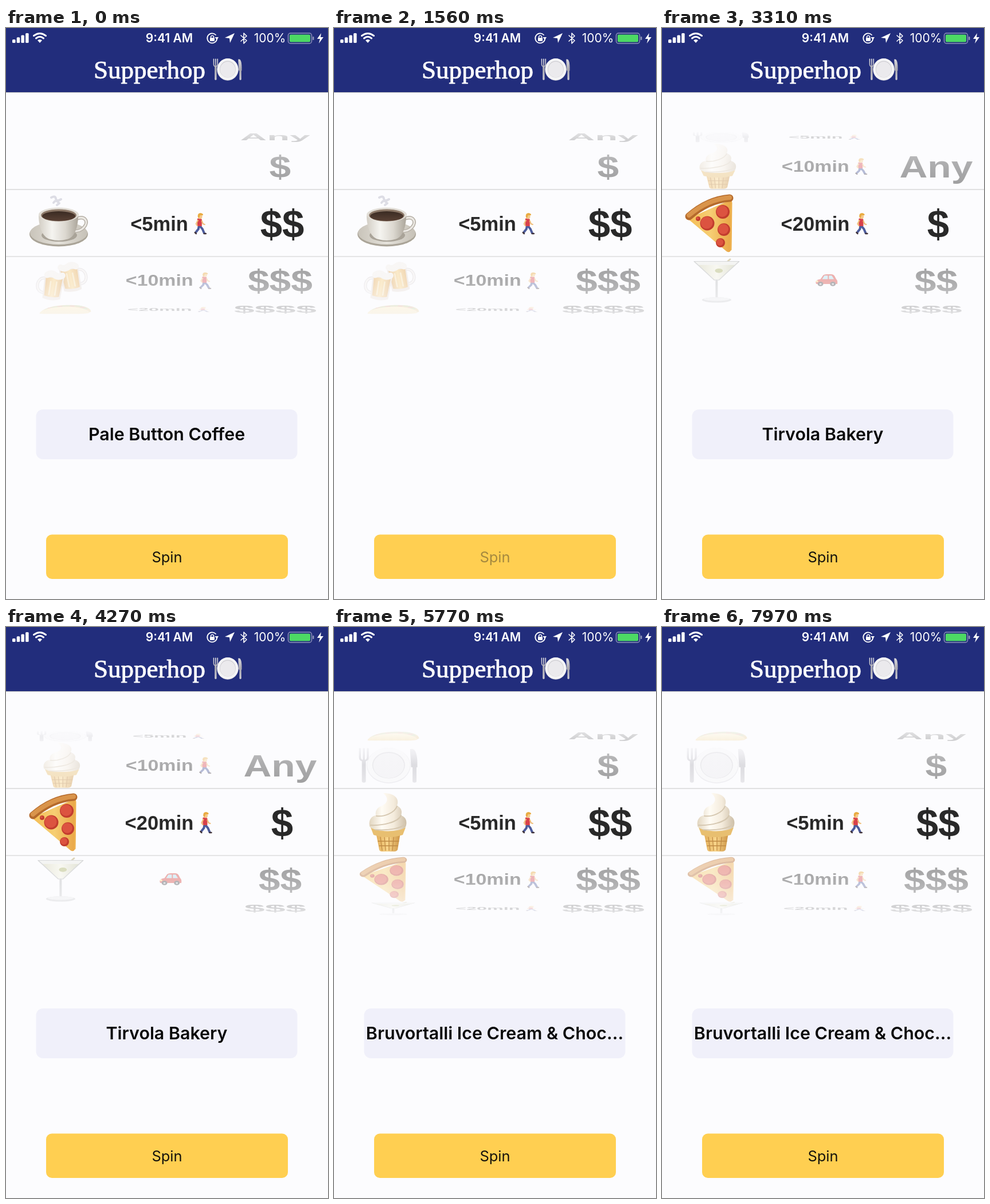
Animation, 562 px wide and 997 px high, one loop 8.07 s. Source, as an HTML page with a canvas:

```html
<!DOCTYPE html>
<html lang="en">
<head>
<meta charset="utf-8">
<title>Picker</title>
<style>
  html, body { margin: 0; width: 100%; height: 100%; overflow: hidden; background: #fcfcfe; }
  canvas { display: block; }
</style>
</head>
<body>
<canvas id="stage" width="562" height="997"></canvas>
<script>
const g = document.getElementById('stage').getContext('2d');
const LOOP = 8070, ROLL = 600, STAGGER = 32;
const MID = 341, RADIUS = 165, STEP = 38 * Math.PI / 180;
const BG = '#fcfcfe';

// Drawing helpers
function fill(color, d) { g.fillStyle = color; g.fill(new Path2D(d)); }
function line(color, width, d) {
  g.strokeStyle = color;
  g.lineWidth = width;
  g.lineCap = g.lineJoin = 'round';
  g.stroke(new Path2D(d));
}
function oval(color, x, y, rx, ry = rx) {
  g.fillStyle = color;
  g.beginPath();
  g.ellipse(x, y, rx, ry, 0, 0, 7);
  g.fill();
}
function box(color, x, y, w, h, r = 0) {
  g.fillStyle = color;
  g.beginPath();
  g.roundRect(x, y, w, h, r);
  g.fill();
}
function text(str, x, y, font, color, align = 'center') {
  g.font = font;
  g.fillStyle = color;
  g.textAlign = align;
  g.fillText(str, x, y);
}
function at(x, y, sx, sy, draw, turn = 0) {
  g.save();
  g.translate(x, y);
  g.rotate(turn);
  g.scale(sx, sy);
  draw();
  g.restore();
}
function ramp(x1, y1, x2, y2, ...colors) {
  const grad = g.createLinearGradient(x1, y1, x2, y2);
  colors.forEach((c, i) => grad.addColorStop(i / (colors.length - 1), c));
  return grad;
}

// Pictures, each about 100 px wide around its centre
function coffee() {
  oval('#aaa498', 0, 19, 51, 21.5);
  oval(ramp(-50, 0, 50, 0, '#c9c4ba', '#e4e1da', '#c6c1b7'), 0, 17, 50, 20);
  oval('#a9a398', 1, 21, 31, 11);
  line('#b5afa5', 6, 'M31 -8C46 -14 53 -3 44 7C40 12 32 14 26 14');
  line('#ece9e4', 3, 'M31 -8C46 -14 53 -3 44 7C40 12 32 14 26 14');
  fill(ramp(-35, 0, 35, 0, '#d3cec5', '#f5f4f0', '#dcd8d0', '#a9a398'),
    'M-35 -14C-35 8 -27 26 -14 28Q0 32 14 28C27 26 34 8 34 -14Z');
  oval('#e2ded7', 0, -15, 35, 12.5);
  oval('#8d7969', 0, -14, 31, 10.5);
  oval(ramp(0, -24, 0, -4, '#352720', '#594135'), 0, -12.5, 29, 8.5);
  line('#dddde5', 4, 'M-13 -45Q-6 -49 -5 -43T4 -42M-9 -36Q-5 -42 -1 -37M-3 -32L1 -35');
}
function mug() {
  line('#d8d3d6', 6, 'M-18 -12C-36 -14 -37 17 -18 17');
  line('#f4f1ee', 3, 'M-18 -12C-36 -14 -37 17 -18 17');
  fill('#e4d9cf', 'M-20 -23H20L18 28Q0 34 -18 28Z');
  fill(ramp(-16, 0, 16, 0, '#e2a44c', '#f8d07c', '#dc9d48'), 'M-17 -14H17L15 23Q0 27 -15 23Z');
  line('#f7dfaa', 3, 'M-6 -6V20M6 -6V20');
  line('#f3efe9', 13, 'M-15 -19Q-8 -25 0 -20T15 -20');
}
function beers() {
  at(17, -9, -.88, 1.12, mug, -.16);
  at(-13, 10, .88, 1.12, mug, .12);
}
function taco() {
  fill('#dcb35c', 'M-47 28C-42 -13 -17 -36 11 -34C35 -32 47 -12 48 17Q43 29 26 30Z');
  line('#a3ba70', 8, 'M-36 4Q-24 -22 3 -28T38 -5');
  for (const [x, y] of [[-28, -9], [-10, -22], [13, -26], [32, -15]]) oval('#d98468', x, y, 5);
  fill(ramp(0, -20, 0, 34, '#ffe69c', '#edc872'),
    'M-48 30C-43 -3 -20 -22 4 -20C29 -19 44 4 45 25Q42 34 25 34H-40Q-47 34 -48 30Z');
}
function plate() {
  const metal = ramp(0, -38, 0, 38, '#dedde2', '#a9a8b0', '#cccbd1');
  oval('#dddce1', 0, 1, 39, 40);
  oval('#f5f5f6', 0, 0, 38, 39);
  oval('#cdccd1', 0, 0, 29, 30);
  oval('#ebeaed', 0, 1, 27.5, 28.5);
  line(metal, 3.5, 'M-51 -37V-18Q-51 -10 -44 -10T-37 -18V-37M-44 -37V-10');
  line(metal, 7, 'M-44 -9V36');
  fill(metal, 'M38 -36Q50 -41 51 -8V5H40Z');
  line(metal, 7, 'M46 3V36');
}
function cone() {
  fill(ramp(-22, 0, 25, 0, '#dfa750', '#f8d58b', '#cb9243'), 'M-20 12H25L19 48Q17 51 13 51H-8Q-12 51 -13 48Z');
  line('#c08b44', 1.3, 'M-11 26L-8 49M-4 26L-2 49M4 26V49M12 26L10 49M-15 33H21M-13 41H19');
  fill('#e8bf70', 'M-28 9Q2 20 33 9L28 22Q2 30 -23 22Z');
  fill(ramp(-30, 0, 34, 0, '#e2d6c0', '#fffcf5', '#f4ebdc', '#cdbfa8'),
    'M-30 7C-32 -5 -26 -11 -19 -12C-21 -22 -14 -27 -8 -29C2 -34 4 -42 -6 -51C13 -51 23 -42 18 -29C27 -25 27 -17 25 -12C35 -9 36 1 33 8C25 18 -23 18 -30 7Z');
  line('#d5c7b0', 2, 'M-18 -11C-4 -9 14 -17 18 -28M-28 5C-8 6 20 0 25 -12M-20 13C4 15 26 10 32 3');
}
function pizza() {
  fill(ramp(-45, 0, 30, 0, '#f4bd55', '#f6ce73', '#e9a546'), 'M-47 -8L30 -42L29 45Q26 55 17 46Z');
  line('#b56a2c', 13, 'M-45 -12Q-12 -41 26 -44');
  line('#d9944b', 8, 'M-45 -14Q-12 -42 26 -45');
  for (const [x, y, r] of [[-13, 0, 12.5], [14, -20, 12], [16, 11, 11], [10, 34, 8], [-29, -8, 4]]) {
    oval('#c23c2e', x, y, r);
    oval('#dc5340', x - 1, y - 1, r - 2);
  }
  line('#eeb14e', 3, 'M29 -36L28 46');
}
function cocktail() {
  line('#b6a465', 3, 'M24 -48L-4 -16');
  fill('#e9eae4', 'M-40 -43H40L5 0H-5Z');
  fill(ramp(-30, 0, 30, 0, '#d3d2b2', '#f2f1df', '#c6c8a8'), 'M-33 -35H33L4 -2H-4Z');
  oval('#a9b064', 4, -22, 7, 5);
  line('#a9abab', 1.5, 'M-40 -43H40L4 -1H-4Z');
  line('#b5b7b8', 4, 'M0 0V42');
  oval('#b9bbbd', 0, 44, 26, 6);
  oval('#e3e4e5', 0, 42, 23, 4);
}
function car() {
  fill('#d53b35', 'M-19 2Q-17 -2 -11 -3L-6 -12Q-4 -14 0 -14H8Q12 -14 14 -10L17 -3Q20 0 19 8H-18Q-20 7 -19 2Z');
  fill('#aee0ee', 'M-8 -3L-4 -11H2V-3ZM4 -3V-11H9L13 -3Z');
  for (const x of [-11, 11]) {
    oval('#39383d', x, 8, 5);
    oval('#c5c5c9', x, 8, 2);
  }
  oval('#ffdf75', -17, 2, 2);
}
function walker() {
  line('#4d5c9c', 4, 'M-2 4L3 10L6 17M-3 4L-4 10L-8 15');
  line('#40333b', 2.5, 'M6 18H9M-10 16L-8 18');
  fill('#d8414a', 'M-6 -8Q-2 -10 2 -7L2 5H-6Z');
  line('#f0bd79', 2.2, 'M-5 -5L-8 1L-6 4M2 -4L4 1L7 2');
  oval('#f5c98a', -1, -12, 3.8, 4.5);
  fill('#e9ac42', 'M-5 -11Q-6 -18 0 -18Q5 -17 4 -14L-1 -14L-3 -9Z');
}

const walk = label => () => {
  g.font = 'bold 34.5px "Liberation Sans", Arial, sans-serif';
  const half = g.measureText(label).width / 2;
  text(label, -half - 20, 12.5, g.font, '#292929', 'left');
  at(half + 2, 0, 1, 1, walker);
};
const price = label => () =>
  text(label, 0, 25, 'bold 69px "Liberation Sans", Arial, sans-serif', '#292929');

const columns = [
  { x: 92, rows: [coffee, beers, taco, plate, cone, pizza, cocktail] },
  { x: 287.5, rows: [walk('<5min'), walk('<10min'), walk('<20min'), car] },
  { x: 482, rows: ['Any', '$', '$$', '$$$', '$$$$'].map(price) }
];
const spins = [
  { start: 1570, from: [0, 0, 2], to: [7, 5, 6] },
  { start: 2600, from: [0, 1, 1], to: [5, 2, 1] },
  { start: 4723, from: [5, 2, 1], to: [11, 8, 7] }
];
const places = ['Pale Button Coffee', 'St. Ovrin Coffee At TULV',
  'Tirvola Bakery', 'Bruvortalli Ice Cream & Choc...'];

function drawColumn({ x, rows }, pos, wraps) {
  const n = rows.length;
  for (let i = Math.ceil(pos - 2.3); i <= pos + 2.3; i++) {
    if (!wraps && (i < 0 || i >= n)) continue;
    const angle = (i - pos) * STEP, depth = Math.cos(angle);
    const s = 1 / (1 + .085 * (1 - depth));
    at(281 + (x - 281) * s, MID + RADIUS * Math.sin(angle) * s, s, s * depth, rows[(i + n) % n]);
  }
}

function drawWheels(t, spin) {
  g.save();
  g.beginPath();
  g.rect(0, 179, 562, 325);
  g.clip();
  columns.forEach((col, i) => {
    const from = spin.from[i], to = spin.to[i];
    const u = Math.min(1, Math.max(0, (t - spin.start - STAGGER * (2 - i)) / ROLL));
    const moving = u > 0 && u < 1 && from !== to;
    const pos = u < 1 ? from + (to - from) * (1 - (1 - u) ** 3) : to % col.rows.length;
    drawColumn(col, pos, moving);
  });
  // Fade everything outside the selected band
  for (const [edge, band] of [[179, 282], [504, 399]]) {
    const veil = g.createLinearGradient(0, edge, 0, band);
    for (const [stop, a] of [[0, .9], [.15, .8], [.55, .63], [1, .54]])
      veil.addColorStop(stop, `rgba(252,252,254,${a})`);
    box(veil, 0, Math.min(edge, band), 562, Math.abs(band - edge));
  }
  g.restore();
  box('#c8c8c8', 0, 281.5, 562, 1);
  box('#d0d0d0', 0, 398.5, 562, 1);
}

function drawHeader() {
  const white = '#fff', ui = 'Inter, Roboto, sans-serif';
  box('#222d7c', 0, 0, 562, 112);
  box('#b0b1b8', 0, 112, 562, 1);
  for (let i = 0; i < 4; i++) {
    const h = 6 + i * 3.7;
    box(white, 11 + i * 7.7, 26 - h, 5.5, h, 1.5);
  }
  fill(white, 'M59 26L55 21.5Q59 18.5 63 21.5Z');
  line(white, 3, 'M52.5 18Q59 12.5 65.5 18M48.5 13.5Q59 5.5 69.5 13.5');
  text('9:41 AM', 285, 25, `600 21px ${ui}`, white);
  line(white, 1.8, 'M366 12A8.5 8.5 0 1 0 368 20');
  fill(white, 'M364.5 16H371L368 21Z');
  box(white, 356, 17, 8, 6, 1);
  line(white, 1.5, 'M357.5 17V15Q360 11.5 362.5 15V17');
  fill(white, 'M399 9L391 26L390 18L382 17Z');
  line(white, 1.6, 'M410 13L420 22L415 27V9L420 14L410 23');
  text('100%', 460.5, 25, `400 21px ${ui}`, white);
  g.strokeStyle = '#8c93b8';
  g.lineWidth = 1.5;
  g.beginPath();
  g.roundRect(492.5, 9, 41, 18, 4);
  g.stroke();
  box('#4cd964', 495, 11.5, 36, 13, 2);
  box('#8c93b8', 535, 15, 2.5, 6, 1);
  fill(white, 'M550 9L543 19H548L546 27L554 16H549Z');

  const serif = '45px "Liberation Serif", "Times New Roman", serif';
  text('Supperhop', 153, 88, serif, white, 'left');
  g.strokeStyle = white;
  g.lineWidth = .9;
  g.strokeText('Supperhop', 153, 88);
  at(387, 72, .48, .48, plate);
}

function draw(t) {
  const last = spins.filter(s => t >= s.start - 60).length;
  const spin = spins[Math.max(0, last - 1)];
  const busy = last > 0 && t < spin.start + ROLL + 2 * STAGGER;

  box(BG, 0, 0, 562, 997);
  drawHeader();
  drawWheels(t, spin);
  if (!busy) {
    box('#f0f0fa', 52.5, 666, 456, 87, 12);
    text(places[last], 280.5, 720, '600 30.4px Inter, Roboto, sans-serif', '#080808');
  }
  box('#ffcf51', 70, 884.5, 422, 77.5, 10);
  text('Spin', 281, 933, '400 25.5px Inter, Roboto, sans-serif', busy ? '#a5893f' : '#15130c');
}

const begin = performance.now();
function tick() {
  draw((performance.now() - begin) % LOOP);
  requestAnimationFrame(tick);
}
tick();
</script>
</body>
</html>
```
